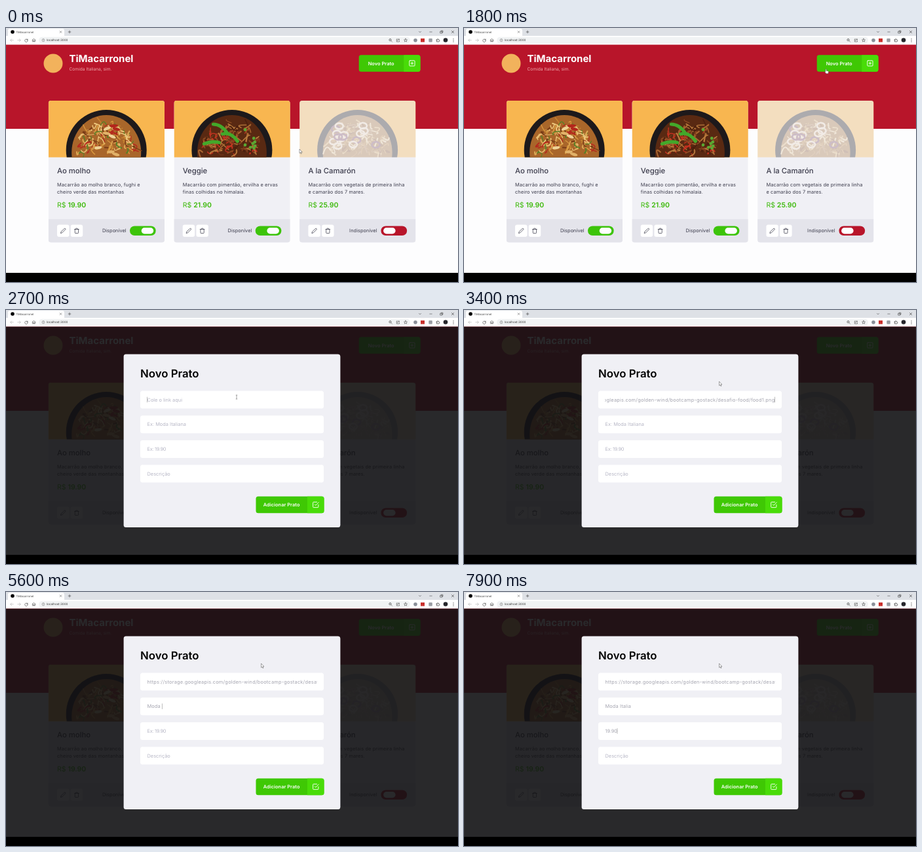
Write an HTML page that moves like this. It is 690 by 388 pixels and loops after 8000 ms.

```html
<!DOCTYPE html>
<html lang="pt-BR">
<head>
<meta charset="utf-8">
<title>TiMacarronel</title>
<style>
html, body { margin: 0; width: 100%; height: 100%; overflow: hidden; background: #000; }
svg { display: block; width: 690px; height: 388px; font-family: Inter, Roboto, sans-serif; text-rendering: geometricPrecision; }
</style>
</head>
<body>
<svg id="stage" viewBox="0 0 690 388" xmlns="http://www.w3.org/2000/svg"></svg>
<script>
const INK = '#3d3d4d', RED = '#b8152a', GREEN = '#3dc40a';
const URL_TEXT = 'https://storage.googleapis.com/golden-wind/bootcamp-gostack/desafio-food/food1.png';
const FIELD_Y = [123.5, 161.2, 198.9, 236.6];
const HINTS = ['Cole o link aqui', 'Ex: Moda Italiana', 'Ex: 19.90', 'Descrição'];

const rect = (x, y, w, h, fill, r = 0) =>
  `<rect x="${x}" y="${y}" width="${w}" height="${h}" rx="${r}" fill="${fill}"/>`;
const circle = (x, y, r, fill) => `<circle cx="${x}" cy="${y}" r="${r}" fill="${fill}"/>`;
const text = (s, x, y, size, fill, weight = 400, gap = 0, more = '') =>
  `<text x="${x}" y="${y}" font-size="${size}" fill="${fill}" font-weight="${weight}" letter-spacing="${gap}" ${more}>${s}</text>`;
// Line icon on a 24-unit grid, centred on x, y
const icon = (d, x, y, size, color, width = 2) =>
  `<path d="${d}" transform="translate(${x - size / 2} ${y - size / 2}) scale(${size / 24})" fill="none" stroke="${color}" stroke-width="${width}" stroke-linecap="round" stroke-linejoin="round"/>`;

const ICON = {
  edit: 'M17 3a2.8 2.8 0 1 1 4 4L7.5 20.5 2 22l1.5-5.5Z',
  trash: 'M3 6H21M19 6V20a2 2 0 0 1-2 2H7a2 2 0 0 1-2-2V6M8 6V4a2 2 0 0 1 2-2h4a2 2 0 0 1 2 2V6',
  plus: 'M5 3H19a2 2 0 0 1 2 2V19a2 2 0 0 1-2 2H5a2 2 0 0 1-2-2V5a2 2 0 0 1 2-2ZM12 8V16M8 12H16',
  check: 'M9 11l3 3L22 4M21 12v7a2 2 0 0 1-2 2H5a2 2 0 0 1-2-2V5a2 2 0 0 1 2-2h11',
  cross: 'M4 4L20 20M20 4L4 20',
  add: 'M12 3V21M3 12H21',
  down: 'M4 8L12 16L20 8',
  minus: 'M3 12H21',
  restore: 'M3 8H16V21H3ZM8 8V3H21V16H16',
  back: 'M21 12H3M11 4L3 12L11 20',
  next: 'M3 12H21M13 4L21 12L13 20',
  reload: 'M20 5V10H15M20 10A9 9 0 1 0 21 14',
  home: 'M2 12L12 3L22 12M5 10V21H10V15H14V21H19V10',
  info: 'M12 2A10 10 0 1 0 12 22A10 10 0 1 0 12 2M12 11V17M12 7V7.5',
  zoom: 'M10 3A7 7 0 1 0 10 17A7 7 0 1 0 10 3M15 15L22 22M7 10H13',
  share: 'M10 5H3V21H20V15M8 15C9 9 13 7 20 7M16 3L21 7L16 11',
  star: 'M12 2L15 9L22 9.5L17 14L18.5 21L12 17.5L5.5 21L7 14L2 9.5L9 9Z',
  puzzle: 'M4 8H9V6A2.5 2.5 0 0 1 14 6V8H19V13H20A2.5 2.5 0 0 1 20 18H19V21H4V16H6A2 2 0 0 0 6 12H4Z'
};

function rng(seed) {
  return () => (seed = (seed * 16807) % 2147483647) / 2147483647;
}

const DISHES = [
  { name: 'Ao molho', lines: ['Macarrão ao molho branco, fughi e', 'cheiro verde das montanhas'], price: '19.90', on: true,
    base: '#a9662a', tones: ['#dba653', '#c58331', '#edc77c', '#7b3d17', '#d9983f', '#b52a1d', '#e8bd72', '#5c7f27'] },
  { name: 'Veggie', lines: ['Macarrão com pimentão, ervilha e ervas', 'finas colhidas no himalaia.'], price: '21.90', on: true,
    base: '#592912', tones: ['#8d4b22', '#a9652f', '#4a1e0d', '#b97a3d', '#7a3a1a', '#c5301f'] },
  { name: 'A la Camarón', lines: ['Macarrão com vegetais de primeira linha', 'e camarão dos 7 mares.'], price: '25.90', on: false,
    base: '#a7773f', tones: ['#dfb878', '#c89452', '#efd6a8', '#8d5a35', '#b98a5a'] }
];

function food(dish, n) {
  const rnd = rng(911 + n * 7717);
  let s = circle(88.5, 75.5, 61.5, '#1d191b') + `<ellipse cx="88.5" cy="79" rx="53" ry="57" fill="${dish.base}"/>`;
  for (let i = 0; i < 110; i++) {
    const a = Math.PI * (1 + rnd()), r = Math.sqrt(rnd()) * 46;
    const x = 88.5 + r * Math.cos(a), y = 80 + r * 1.04 * Math.sin(a);
    const bend = () => ((rnd() - 0.5) * 22).toFixed(1);
    s += `<path d="M${x.toFixed(1)} ${y.toFixed(1)}q${bend()} ${bend()} ${bend()} ${bend()}" fill="none" stroke="${dish.tones[i % dish.tones.length]}" stroke-width="${(1 + rnd() * 1.3).toFixed(1)}" stroke-linecap="round"/>`;
  }
  if (n === 0) {
    for (let i = 0; i < 9; i++)
      s += `<ellipse cx="${58 + rnd() * 62}" cy="${38 + rnd() * 42}" rx="6" ry="2.3" fill="${['#efd397', '#e2b269', '#b3261b'][i % 3]}" transform="rotate(${rnd() * 60 - 30} 88 65)"/>`;
  }
  if (n === 1) {
    s += '<g fill="none" stroke="#43a82a" stroke-width="5" stroke-linecap="round"><path d="M60 36Q72 36 81 49"/><path d="M74 51Q87 47 97 62"/><path d="M46 66Q57 61 69 64"/></g>';
    for (let i = 0; i < 8; i++) s += circle(108 + rnd() * 18, 44 + rnd() * 32, 2.4, '#5aa832');
  }
  if (n === 2) {
    for (let i = 0; i < 15; i++)
      s += `<ellipse cx="${52 + rnd() * 73}" cy="${37 + rnd() * 45}" rx="6" ry="4.5" fill="none" stroke="${i % 3 ? '#f3dfc6' : '#83516b'}" stroke-width="2.6"/>`;
  }
  return s;
}

function card(dish, n) {
  const knob = dish.on ? 142 : 128;
  return `<g transform="translate(${64.7 + n * 191.7} 111)"><g clip-path="url(#card)">
    ${rect(0, 0, 177.3, 216.5, '#f0f0f5')}
    <g clip-path="url(#photo)" opacity="${dish.on ? 1 : 0.32}">${rect(0, 0, 178, 87, '#f8b650')}${food(dish, n)}</g>
    ${rect(0, 181, 177.3, 36, '#e4e4eb')}</g>
    ${text(dish.name, 13.3, 111.3, 11.3, INK, 500)}
    ${dish.lines.map((l, i) => text(l, 13.3, 131 + i * 11, 7.4, INK, 400, 0.12)).join('')}
    ${text(`R$ <tspan font-weight="600">${dish.price}</tspan>`, 13.3, 163, 10.5, '#3ab907')}
    ${rect(13.3, 189.5, 18.5, 18.5, '#fff', 3)}${rect(34, 189.5, 18.5, 18.5, '#fff', 3)}
    ${icon(ICON.edit, 22.5, 198.8, 9, INK)}${icon(ICON.trash, 43.2, 198.8, 9, INK)}
    ${text(dish.on ? 'Disponível' : 'Indisponível', dish.on ? 82.2 : 76, 201.3, 7.4, INK, 400, 0.05)}
    ${rect(124.3, 191.5, 39.7, 14.5, dish.on ? GREEN : RED, 7.2)}${rect(knob, 194, 18.5, 9.5, '#fff', 4.7)}</g>`;
}

function button(x, y, w, split, pad, label, pic) {
  return rect(x, y, w, 25.5, '#3fc804', 3.5) +
    `<path d="M${split} ${y}H${x + w - 3.5}q3.5 0 3.5 3.5v18.5q0 3.5-3.5 3.5H${split}Z" fill="#49dc08"/>` +
    text(label, x + pad, y + 15.5, 7.4, '#fff', 600, 0.04) + icon(pic, (split + x + w) / 2, y + 12.7, 11, '#fff');
}

function browser() {
  const bar = [['back', 9, '#b5b5b5'], ['next', 20, '#b5b5b5'], ['reload', 31, '#444'], ['home', 42.5, '#444'], ['zoom', 587, '#555'],
    ['share', 598.5, '#555'], ['star', 610, '#555'], ['puzzle', 659.3, '#333']];
  const win = [['cross', 83.5, 4], ['add', 97, 5], ['down', 632, 4.5], ['minus', 648.5, 4.5], ['restore', 665, 5], ['cross', 682, 5]];
  return rect(0, 0, 690, 12.5, '#dee1e6') + rect(3, 1, 86, 14, '#fff', 3) + rect(0, 12, 690, 13.5, '#fff') +
    circle(10, 6, 2.8, '#000') + text('TiMacarronel', 15.5, 7.6, 4.3, '#444') +
    win.map(([k, x, s]) => icon(ICON[k], x, 6, s, '#333', 2.8)).join('') +
    rect(50, 13.8, 567, 10, '#f1f3f4', 5) + icon(ICON.info, 57, 18.7, 5, '#555') +
    text('localhost:3000', 62, 20.4, 4.6, '#333') +
    bar.map(([k, x, c]) => icon(ICON[k], x, 18.7, 6, c, 2.6)).join('') +
    circle(625, 18.7, 2.8, '#8a8f98') + rect(633, 16, 6, 5.5, '#c9302c') + rect(645.3, 16, 5.5, 5.5, '#9a9da3', 1) +
    circle(671, 18.5, 3.3, '#26262b') + [16.5, 18.7, 20.9].map(y => circle(683, y, 0.6, '#444')).join('');
}

function modal() {
  const fields = FIELD_Y.map((y, i) => rect(205, y, 280, 27, '#fff', 3.5) +
    `<g clip-path="url(#inputs)">${text(HINTS[i], 215.5, y + 16, 7.4, '#b7b7c6', 400, 0, `id="in${i}"`)}</g>`).join('');
  return `<g id="modal">${rect(0, 25.5, 690, 348.5, 'rgba(18,18,20,.9)')}
    ${rect(179.6, 67.6, 330.8, 264.4, '#f0f0f5', 3.5)}
    ${text('Novo Prato', 205, 103.3, 16.8, '#000', 600)}${fields}
    ${button(381.5, 284.8, 104, 460, 11.3, 'Adicionar Prato', ICON.check)}
    <rect id="caret" width=".5" height="8.5" fill="#777"/></g>`;
}

const pointers = `<g id="pointer" stroke="#444" stroke-width=".5" stroke-linejoin="round" fill="#fff">
  <path id="arrow" d="M0 0V6.3L1.4 5L2.4 7.2L3.3 6.8L2.4 4.6H4.3Z"/>
  <path id="hand" d="M0 .6Q.6-.4 1.2 .6V2.7L3.8 3.2Q4.7 3.4 4.5 4.4L4 7.2H.9L-1.2 4.5Q-1.2 3.6-.2 4.2Z"/>
  <path id="beam" d="M-1.2-3H1.2M0-3V3M-1.2 3H1.2" fill="none"/></g>`;

document.getElementById('stage').innerHTML = `<defs>
  <clipPath id="card">${rect(0, 0, 177.3, 216.5, '#000', 4)}</clipPath>
  <clipPath id="photo">${rect(0, 0, 178, 86.5, '#000')}</clipPath>
  <clipPath id="inputs">${rect(215.3, 120, 259.7, 150, '#000')}</clipPath></defs>` +
  rect(0, 0, 690, 374, '#fdfdfe') + browser() + rect(0, 25.5, 690, 128.5, RED) +
  circle(72, 54, 14.5, '#f2b25c') + text('TiMacarronel', 96.5, 52.3, 15, '#fff', 700) +
  text('Comida Italiana, sim.', 96.5, 65.2, 6.65, '#eda6aa') +
  button(538.7, 41.2, 93.8, 607.3, 14, 'Novo Prato', ICON.plus) +
  DISHES.map(card).join('') + modal() + rect(0, 374, 690, 14, '#000') + pointers;

const $ = id => document.getElementById(id);
const show = (id, on) => $(id).setAttribute('visibility', on ? 'inherit' : 'hidden');

// Pointer stops: time, x, y
const PATH = [[0, 448, 185], [700, 448, 185], [1700, 552, 62.5], [1900, 552, 62.5],
  [2500, 352, 133], [2700, 352, 133], [3000, 389.6, 109.2], [8000, 389.6, 109.2]];
// Key presses: time, characters typed so far
const NAME_KEYS = [[4700, 1], [5000, 2], [5100, 3], [5200, 4], [5600, 5], [5900, 7], [6100, 8], [6300, 10], [6400, 11]];
const PRICE_KEYS = [[7000, 1], [7300, 2], [7600, 3], [7800, 4], [7900, 5]];

function pointerAt(t) {
  const i = PATH.findIndex((p, k) => t < PATH[k + 1][0]);
  const [t0, x0, y0] = PATH[i], [t1, x1, y1] = PATH[i + 1];
  const u = (t - t0) / (t1 - t0), e = u * u * (3 - 2 * u);
  return [x0 + (x1 - x0) * e, y0 + (y1 - y0) * e];
}

function typed(s, keys, t) {
  const last = keys.filter(k => k[0] <= t).pop();
  return last ? s.slice(0, last[1]).replace(/ $/, '\u00a0') : '';
}

// Writes the value or the hint and returns the caret's x
function fill(i, value, gap, atEnd = false) {
  const el = $('in' + i);
  const hintGap = i === 2 ? -0.3 : 0;
  el.textContent = value || HINTS[i];
  el.setAttribute('fill', value ? '#a5a5b0' : '#b7b7c6');
  el.setAttribute('letter-spacing', value ? gap : hintGap);
  el.setAttribute('x', atEnd ? 474.4 : 215.5);
  el.setAttribute('text-anchor', atEnd ? 'end' : 'start');
  if (!value) return 215.3;
  return atEnd ? 474.2 : 215.5 + el.getComputedTextLength();
}

function draw(now) {
  const t = Math.floor(now % 8000 / 100) * 100;
  const open = t >= 1900;
  show('modal', open);

  const ends = [
    fill(0, t >= 3300 ? URL_TEXT : '', 0.22, t < 4000 && t >= 3300),
    fill(1, typed('Moda Italia', NAME_KEYS, t), 0.12),
    fill(2, typed('19.90', PRICE_KEYS, t), -0.1)
  ];
  const focus = t < 4000 ? 0 : t < 6700 ? 1 : 2;
  const blink = t === 3300 || (t >= 4500 && t < 4700);
  $('caret').setAttribute('x', ends[focus]);
  $('caret').setAttribute('y', FIELD_Y[focus] + 9.2);
  show('caret', open && t >= 2700 && !blink);

  const [x, y] = pointerAt(t);
  const hand = !open && x > 539 && y < 66.5;
  const beam = open && y > 123.5 && y < 150.5 && x < 485;
  $('pointer').setAttribute('transform', `translate(${x} ${y})`);
  show('hand', hand);
  show('beam', beam);
  show('arrow', !hand && !beam);
}

function loop(now) {
  draw(now);
  requestAnimationFrame(loop);
}
draw(0);
requestAnimationFrame(loop);
</script>
</body>
</html>
```
